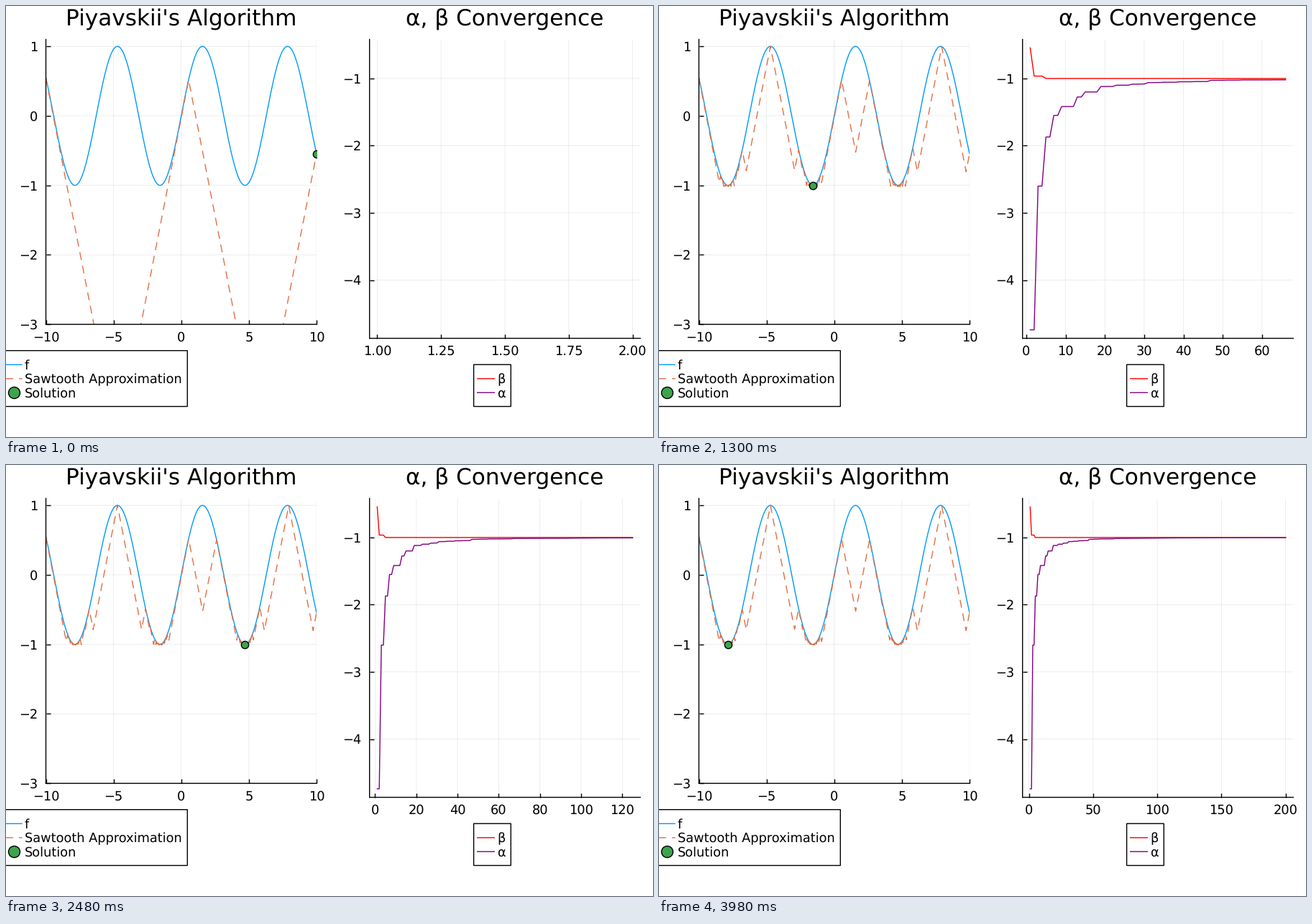
Animation of 900 by 600 pixels, one loop 4 s. Source, as a matplotlib script:

```python
import math

import numpy as np
import matplotlib.pyplot as plt
from matplotlib.animation import FuncAnimation
from matplotlib.patches import Rectangle

W, H, DPI = 900, 600, 100
STEPS, INTERVAL = 200, 20
PX = 72 / DPI  # points per pixel
BLUE, ORANGE, GREEN = "#009AFA", "#E26F46", "#3DA44D"
RED, PURPLE = "#FF0000", "#800080"
LINE = 1.4 * PX
DASH = (0, (11 * PX, 8 * PX))
LABEL, TITLE = 17.8 * PX, 31.2 * PX

plt.rcParams.update({
    "font.family": "DejaVu Sans",
    "text.hinting": "none",
    "lines.scale_dashes": False,
    "axes.unicode_minus": True,
    "path.snap": False,
})


# --- Piyavskii's algorithm for sin(x), Lipschitz constant 1 ---

def tip(a, b):
    """Lowest point of the lower bound between two samples."""
    return ((a[0] + b[0] + a[1] - b[1]) / 2,
            (a[1] + b[1] - (b[0] - a[0])) / 2)


def priority(t):
    # Sibling tips are equally deep: take the one with the larger value first.
    return round(t[1], 9), -math.sin(t[0])


def solve(lo, hi, steps):
    pts = [(x, math.sin(x)) for x in (lo, hi)]
    best = min(pts, key=lambda p: p[1])
    history = []
    for _ in range(steps):
        tips = [tip(a, b) for a, b in zip(pts, pts[1:])]
        i = min(range(len(tips)), key=lambda j: priority(tips[j]))
        pts.insert(i + 1, (tips[i][0], math.sin(tips[i][0])))
        tips = [tip(a, b) for a, b in zip(pts, pts[1:])]
        for x in [pts[i + 1][0]] + [t[0] for t in tips]:
            if math.sin(x) < best[1]:
                best = (x, math.sin(x))
        alpha = min(t[1] for t in tips)
        history.append((np.array(sorted(pts + tips)), best, alpha))
    return history


# --- Tick choice: weighs granularity, zero, coverage and niceness ---

NICE = ((1, 1.0), (5, 0.9), (2, 0.7), (2.5, 0.5), (3, 0.2))


def choose_ticks(lo, hi, k_min=4, k_max=8, ideal=5):
    span = hi - lo
    z = math.ceil(math.log10(span))
    top, result = -math.inf, ([], 1)
    while 2 * k_max * 10.0 ** (z + 1) > span:
        for k in range(k_min, 2 * k_max + 1):
            for q, nice in NICE:
                step = q * 10.0 ** z
                reach = (k - 1) * step
                if not span <= reach < 2 * span:
                    continue
                r = math.ceil((hi - reach) / step)
                while r * step <= lo:
                    ticks = [(r + i) * step for i in range(k)]
                    ticks = [t for t in ticks if lo <= t <= hi]
                    n = len(ticks)
                    if k_min <= n <= k_max:
                        score = ((1 - abs(n - ideal) / ideal) / 4
                                 + (r <= 0 and -r < k) / 6
                                 + 0.5 * span / ((n - 1) * step)
                                 + nice / 4)
                        if score > top + 1e-9:
                            top, result = score, (ticks, step)
                    r += 1
        z -= 1
    return result


def tick_labels(ticks, step):
    digits = next(d for d in range(4) if abs(step * 10**d - round(step * 10**d)) < 1e-6)
    return [f"{t:.{digits}f}" for t in ticks]


# --- Figure ---

fig = plt.figure(figsize=(W / DPI, H / DPI), dpi=DPI, facecolor="white")


def panel(x0, y0, x1, y1, xlim, ylim, yticks):
    ax = fig.add_axes([x0 / W, 1 - y1 / H, (x1 - x0) / W, (y1 - y0) / H])
    ax.set(xlim=xlim, ylim=ylim, yticks=yticks)
    ax.patch.set_visible(False)
    ax.set_axisbelow(True)
    ax.grid(color="black", alpha=0.1, lw=0.7 * PX)
    for side in ("top", "right"):
        ax.spines[side].set_visible(False)
    for side in ("left", "bottom"):
        ax.spines[side].set_linewidth(LINE)
    ax.tick_params(direction="in", length=6 * PX, width=LINE, labelsize=LABEL)
    ax.tick_params(axis="x", pad=9.8 * PX)
    ax.tick_params(axis="y", pad=11.5 * PX)
    return ax


def legend_box(x0, y0, x1, y1):
    page.add_patch(Rectangle((x0, y0), x1 - x0, y1 - y0, fc="white", ec="black", lw=LINE))


def entry(x, y, text, color=None, style="-"):
    if color:
        page.plot([x, x + 25], [y, y], color=color, lw=LINE, ls=style,
                  dash_capstyle="butt", solid_capstyle="butt")
    page.text(x + 28, y + 6.2, text, size=LABEL)


page = fig.add_axes([0, 0, 1, 1])
page.set(xlim=(0, W), ylim=(H, 0))
page.axis("off")

page.text(243.7, 28, "Piyavskii's Algorithm", size=TITLE, ha="center")
page.text(694, 28, "α, β Convergence", size=TITLE, ha="center")

legend_box(-7, 479.7, 252.3, 557.5)
entry(-2.3, 499.3, "f", BLUE)
entry(-2.3, 518.8, "Sawtooth Approximation", ORANGE, DASH)
entry(-2.3, 538.2, "Solution")
page.plot(10.6, 538.2, "o", ms=16 * PX, mfc=GREEN, mec="black", mew=LINE)

legend_box(650.6, 499.2, 702.3, 557.5)
entry(655, 518.8, "β", RED)
entry(655, 538.2, "α", PURPLE)

history = solve(-10, 10, STEPS)
alphas = [h[2] for h in history]
betas = [h[1][1] for h in history]
pad = 0.03 * (betas[0] - alphas[0])

left = panel(55.5, 46.5, 432, 443.2, (-10, 10), (-3, 1.1), range(-3, 2))
left.set_xticks(range(-10, 11, 5))
right = panel(505.7, 46.5, 882.3, 462.6, (0, 1),
              (alphas[0] - pad, betas[0] + pad), range(-4, 0))

xs = np.linspace(-10, 10, 600)
left.plot(xs, np.sin(xs), color=BLUE, lw=LINE)
saw, = left.plot([], [], color=ORANGE, lw=LINE, ls=DASH, dash_capstyle="butt")
dot, = left.plot([], [], "o", ms=10.3 * PX, mfc=GREEN, mec="black", mew=LINE)
beta_line, = right.plot([], [], color=RED, lw=LINE)
alpha_line, = right.plot([], [], color=PURPLE, lw=LINE)


def update(i):
    n = i + 1
    path, best, _ = history[i]
    saw.set_data(path[:, 0], path[:, 1])
    dot.set_data([best[0]], [best[1]])
    its = range(1, n + 1)
    beta_line.set_data(its, betas[:n])
    alpha_line.set_data(its, alphas[:n])

    end = max(n, 2)
    margin = 0.03 * (end - 1)
    lo, hi = 1 - margin, end + margin
    ticks, step = choose_ticks(lo, hi)
    right.set_xticks(ticks, tick_labels(ticks, step))
    right.set_xlim(lo, hi)
    return saw, dot, beta_line, alpha_line


anim = FuncAnimation(fig, update, frames=STEPS, interval=INTERVAL,
                     repeat=True, repeat_delay=0, blit=False)
plt.show()
```
